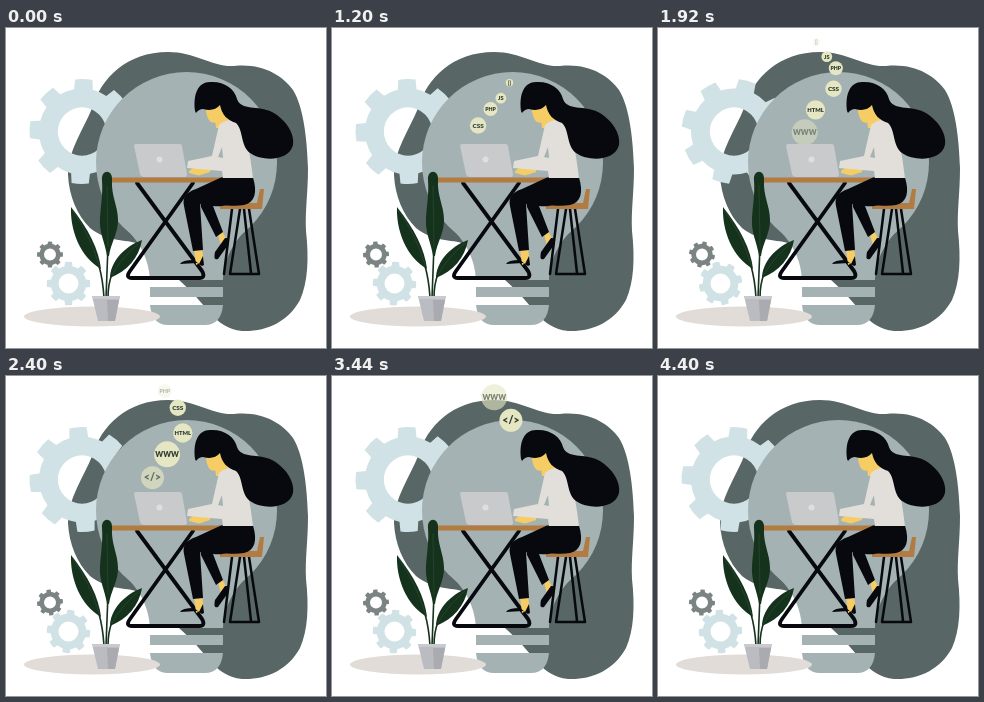
An HTML page with a canvas that plays this animation: 320x320 px, repeating every 4.48 s.

```html
<!DOCTYPE html>
<html lang="en">
<head>
<meta charset="utf-8">
<title>Web developer at work</title>
<style>
html, body { margin: 0; width: 100%; height: 100%; overflow: hidden; background: #fff; }
canvas { display: block; width: 100vw; height: 100vh; }
</style>
</head>
<body>
<canvas id="stage"></canvas>
<script>
const SIZE = 320, LOOP = 4480, STEP = 80;
const canvas = document.getElementById('stage');
const ratio = window.devicePixelRatio || 1;
canvas.width = canvas.height = SIZE * ratio;
const ctx = canvas.getContext('2d');
ctx.scale(ratio, ratio);

const C = {
  slate: '#586665', bulb: '#a4b2b3', gear: '#d0e2e6', smallGear: '#7c8383',
  black: '#07090e', wood: '#b17b42', skin: '#f6cd65',
  shirt: '#e2dfda', leaf: '#14321c', leafLight: '#2b4a34', bubble: '#e5e6c2', ink: '#2f3b36'
};

function shape(path, color) {
  ctx.fillStyle = color;
  ctx.fill(new Path2D(path));
}

function line(path, color, width) {
  ctx.strokeStyle = color;
  ctx.lineWidth = width;
  ctx.lineCap = ctx.lineJoin = 'round';
  ctx.stroke(new Path2D(path));
}

function disc(x, y, rx, color, ry = rx) {
  ctx.fillStyle = color;
  ctx.beginPath();
  ctx.ellipse(x, y, rx, ry, 0, 0, 2 * Math.PI);
  ctx.fill();
}

function gear(x, y, outer, angle, color) {
  const pitch = Math.PI / 4, body = outer * 0.82, hole = outer * 0.46;
  ctx.beginPath();
  for (let i = 0; i < 8; i++) {
    const a = angle + i * pitch;
    ctx.arc(x, y, outer, a - pitch * 0.21, a + pitch * 0.21);
    ctx.arc(x, y, body, a + pitch * 0.28, a + pitch * 0.72);
  }
  ctx.closePath();
  ctx.moveTo(x + hole, y);
  ctx.arc(x, y, hole, 0, 2 * Math.PI, true);
  ctx.fillStyle = color;
  ctx.fill('evenodd');
}

// Rising bubbles: label, start time, radius, font size
const bubbles = [
  ['{}', 225, 3.7, 4.5], ['JS', 495, 5.4, 5.6], ['PHP', 720, 7, 5.2], ['CSS', 1040, 8.2, 6.4],
  ['HTML', 1460, 9.7, 5.8], ['WWW', 1865, 13, 7.4], ['</>', 2305, 11.5, 10.5]
];
const SPEED = 0.0663;
const track = [
  [147, 112], [147, 108], [146, 96], [150, 89], [160, 79.5], [170, 69], [176, 60],
  [178.5, 51], [179, 43], [176, 36], [170, 30], [162, 21], [157, 12], [155, 7]
];

function along(dist) {
  let left = dist + 4;
  for (let i = 1; i < track.length; i++) {
    const [ax, ay] = track[i - 1], [bx, by] = track[i];
    const len = Math.hypot(bx - ax, by - ay);
    if (left <= len || i === track.length - 1) {
      const k = Math.min(1, left / len);
      return [ax + (bx - ax) * k, ay + (by - ay) * k];
    }
    left -= len;
  }
}

function drawBubble([label, start, radius, size], t) {
  const dist = (t - start) * SPEED;
  if (dist <= -4 || dist >= 118) return;
  const [x, y] = along(dist);
  ctx.globalAlpha = Math.min(1, (dist + 4) / 15, (118 - dist) / 22);
  disc(x, y, radius, C.bubble);
  ctx.fillStyle = C.ink;
  ctx.font = `900 ${size}px Lato, "Open Sans", sans-serif`;
  ctx.textAlign = 'center';
  ctx.textBaseline = 'middle';
  ctx.fillText(label, x, y + 0.4);
  ctx.globalAlpha = 1;
}

function drawBack(turn) {
  shape(`M62 147 C62 122 78 101 86 80 C95 50 121 24 162 24 C190 24 205 39 228 38
    C256 35 276 47 287 62 C298 80 301 112 302 140 C302 165 299 182 300 203
    C303 230 302 254 294 272 C282 294 260 304 236 303 C208 300 202 277 173 252
    C156 238 149 221 134 216 C118 211 102 214 84 200 C71 187 63 168 62 147 Z`, C.slate);
  gear(76, 103.5, 52.5, turn - 88 * Math.PI / 180, C.gear);
  disc(180.5, 134.5, 90.5, C.bulb);
  shape('M115 196 C135 214 143 232 144 252 H217 C218 232 226 214 246 196 Z', C.bulb);
  shape('M144 259 H217 V269 H144 Z', C.bulb);
  shape('M144 277 H217 Q215 297 199 297 H162 Q146 297 144 277 Z', C.bulb);
  gear(44, 226.5, 13, turn, C.smallGear);
  gear(62.5, 255.5, 21.7, -turn, C.gear);
}

function drawPlant() {
  disc(86, 288.5, 68, '#e1dcd8', 10);
  line('M93 238 Q97 252 98 270 M102 218 Q101 245 100 270 M106 246 Q102 256 102 270', C.leaf, 1.6);
  shape('M65 179 C64 202 74 229 95 241 C93 222 82 200 65 179 Z', C.leaf);
  shape('M96 152 C95 141 107 141 106 152 C105 168 112 178 112 192 C112 206 105 214 103 228 H101 C99 214 93 205 94 190 C95 176 97 166 96 152 Z', C.leaf);
  shape('M136 212 C133 230 121 243 104 250 C104 235 117 219 136 212 Z', C.leaf);
  line('M67 183 Q84 207 93 237 M101 158 L102 218 M133 215 Q116 229 106 247', C.leafLight, 0.7);
  shape('M86 268 H114 L109 293 H92 Z', '#bbbcc1');
  shape('M101 272 H113 L109 293 H102 Z', '#a9abb0');
  shape('M86 268 H114 L113 271 H87 Z', '#c9cacd');
}

function drawStool() {
  line('M226 181 L218 246 M234 181 L224 246 H253 L243 181 M238 181 L245 245', C.black, 2.5);
  shape('M254 161 H258 L256 181 H214 V175 H251 Z', C.wood);
}

function drawTable() {
  line('M131 155 L196 243 Q200 250 193 250 H126 Q119 250 124 243 L187 155', C.black, 3.8);
  shape('M105 149.5 H222 V154.5 H105 Z', C.wood);
}

function drawLaptop() {
  shape('M130 116 H173 Q176 116 176 118 L181 146 Q181 149 179 149 H138 Q135 149 134 146 L128 118 Q128 116 130 116 Z', '#c8cacc');
  disc(153.5, 131.5, 3, '#dddfe1');
}

function drawWoman() {
  // far leg
  shape('M212 206 L216 203 L221 212 L215 218 Z', C.skin);
  shape('M219 210 Q225 209 222 217 L212 231 Q207 233 209 224 Z', C.black);
  shape('M244 151 C238 174 220 180 207 178 L217 204 L210 209 L195 179 Q192 165 210 162 Z', C.black);
  // near leg
  shape('M188 221 H196 L198 233 L190 237 Z', C.skin);
  shape('M197 228 L198 237 L196 238 L191 235 L174 236 Q176 232 188 232 L193 236 Z', C.black);
  shape('M215 149.5 H247 Q254 173 238 177 C222 180 203 173 194 176 L197 222 L187 223 L178 178 Q175 166 190 161 Z', C.black);
  // neck, hand and shirt
  shape('M208 84 H223 V100 H210 Z', C.skin);
  shape('M205 138 L190 139 Q182 142 183 145 L193 147.5 L204 144 Z', C.skin);
  shape('M213 97 Q222 89 236 94 Q242 110 247 150 H217 L216 143 L181 140 L182 133 L206 128 Z', C.shirt);
  shape('M216 119 L217 130 L212 129 Z', C.bulb);
  // head and hair
  shape('M199 74 L215 72 L216 88 Q212 97 205 94 Q200 91 199 74 Z', C.skin);
  shape(`M189 83 C187 66 192 54 204 54 C218 53 229 61 231 71 C235 83 252 77 266 84
    C281 92 289 107 287 117 C283 133 257 134 244 125 C234 117 238 103 230 95
    C221 92 216 87 214 77 Q208 84 197 81 Q193 81 190 85 Z`, C.black);
}

function draw(t) {
  // half a turn is four tooth pitches, so the loop closes
  const turn = -t / LOOP * Math.PI;
  ctx.fillStyle = '#fff';
  ctx.fillRect(0, 0, SIZE, SIZE);
  drawBack(turn);
  drawStool();
  bubbles.forEach(b => drawBubble(b, t));
  drawLaptop();
  drawTable();
  drawPlant();
  drawWoman();
}

const begin = performance.now();
function tick() {
  const t = (performance.now() - begin) % LOOP;
  draw(Math.floor(t / STEP) * STEP);
  requestAnimationFrame(tick);
}
tick();
</script>
</body>
</html>
```
